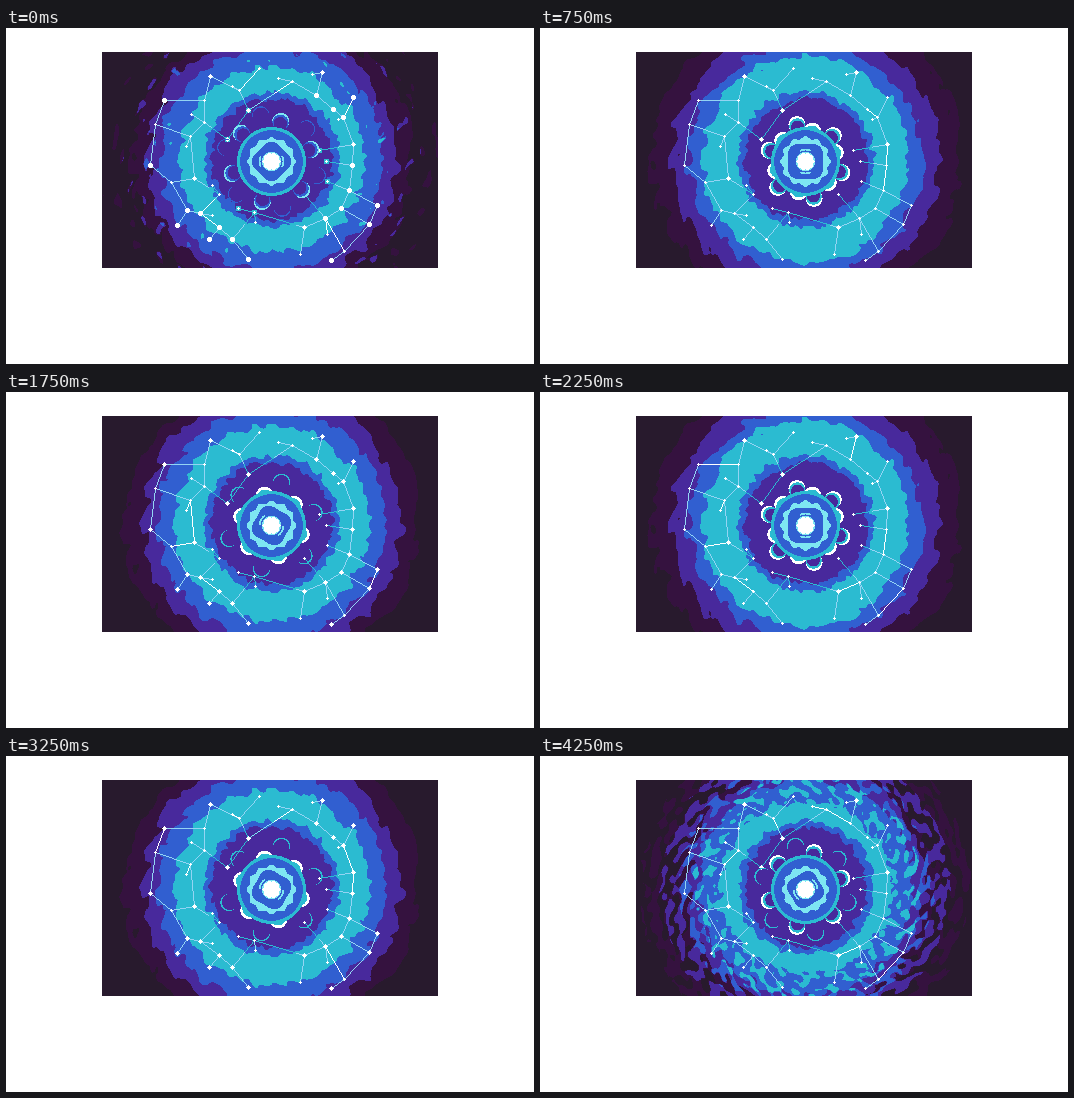
An HTML page with a canvas for the animation above (4500 ms loop, 528 px wide and 336 px high).

```html
<!DOCTYPE html>
<html lang="en">
<head>
<meta charset="utf-8">
<title>Pulsing nebula</title>
<style>
html, body { margin: 0; width: 100%; height: 100%; overflow: hidden; background: #fff; }
canvas { position: absolute; left: 96px; top: 24px; width: 336px; height: 216px; image-rendering: pixelated; }
</style>
</head>
<body>
<canvas id="sky" width="336" height="216"></canvas>
<script>
const W = 336, H = 216, OX = 96, OY = 24;
const STEP = 250, STEPS = 18, PHASES = 6;
const CX = 265, CY = 133, TAU = Math.PI * 2;

const BG = 0, PURPLE = 2, BLUE = 3, CYAN = 4, PALE = 5, WHITE = 6, LINE = 7;
const palette = ['#281a2d', '#35123f', '#48299c', '#315fd0', '#2bbbd1', '#7de6f2', '#ffffff', '#93d4f3']
  .map(h => [1, 3, 5].map(i => parseInt(h.slice(i, i + 2), 16)));

// Key stars: the first group swells once a cycle, the second stays bright.
const pulsing = [
  [158, 72], [144, 137], [347, 69], [310, 67], [327, 81], [337, 89], [346, 137],
  [343, 162], [335, 180], [319, 190], [371, 177], [363, 196], [325, 232], [242, 231],
  [213, 199], [194, 185], [181, 182], [171, 197], [226, 211], [203, 211]
];
const bright = [
  [204, 48], [316, 44], [242, 82], [221, 111], [347, 116], [188, 150], [298, 199]
];
const hubs = [
  [286, 53], [233, 62], [198, 72], [198, 94], [184, 108], [165, 154],
  [298, 166], [213, 166], [248, 184], [338, 223], [149, 96]
];
const keys = [...pulsing, ...bright, ...hubs];

function hash(x, y, seed) {
  let h = Math.imul(x, 374761393) ^ Math.imul(y, 668265263) ^ Math.imul(seed + 7, 974634777);
  h = Math.imul(h ^ (h >>> 13), 1274126177);
  h = Math.imul(h ^ (h >>> 15), 2246822519);
  return ((h ^ (h >>> 16)) >>> 0) / 4294967296;
}

// Gradient noise, wrapping in x after `wrap` cells.
function noise(x, y, wrap, seed) {
  const ix = Math.floor(x), iy = Math.floor(y), fx = x - ix, fy = y - iy;
  const smooth = v => v * v * v * (v * (v * 6 - 15) + 10);
  const corner = (i, j) => {
    const a = hash((ix + i + wrap) % wrap, iy + j, seed) * TAU;
    return Math.cos(a) * (fx - i) + Math.sin(a) * (fy - j);
  };
  const mix = (a, b, t) => a + (b - a) * t;
  const sx = smooth(fx);
  return mix(mix(corner(0, 0), corner(1, 0), sx), mix(corner(0, 1), corner(1, 1), sx), smooth(fy));
}

const easeOut = (t, power) => 1 - (1 - t) ** power;
const ringAge = phase => (phase + 2) % PHASES;
const growth = phase => easeOut(ringAge(phase) / 5, 1.7);

// Outer radius of cyan, blue, purple and dusk.
const ringRadii = e => [78 + 25 * e, 104 + 13 * e, 114 + 20 * e, 118 + 35 * e];

function makeNebula(phase) {
  const px = new Uint8Array(W * H);
  const age = ringAge(phase), e = growth(phase);
  const ring = ringRadii(e);
  const debris = ringRadii(1).map(r => r + 5 * (age + 1));
  const worn = i => 0.35 * (age - 1) - 0.05 + 0.06 * (3 - i);

  for (let y = 0; y < H; y++) {
    for (let x = 0; x < W; x++) {
      const dx = x + OX - 265.5, dy = y + OY - 131, r = Math.hypot(dx, dy);
      const turn = Math.atan2(dy, dx) / TAU + 0.5 + r * 0.0006;
      const drift = r - age * 5;
      const polar = (cells, depth, seed) => noise(turn * cells, drift / depth, cells, seed);
      const bump = polar(44, 14, 1) * 9 + polar(90, 7, 2) * 4;
      let c = BG;
      if (r + bump * 0.7 < 60 + e) c = PURPLE;
      else if (r + bump * 0.7 < 67 + e) c = BLUE;
      else {
        const first = ring.findIndex((edge, i) => r + bump * (1 + i * 0.15) < edge);
        if (first >= 0) c = CYAN - first;
        const mask = age < 3 ? polar(64, 8, 3) : -1;
        const shard = debris.findIndex((edge, i) => r + bump < edge && mask > worn(i));
        if (shard >= 0) c = Math.max(c, CYAN - shard);
      }
      px[y * W + x] = c;
    }
  }
  return px;
}

let buf;
function put(x, y, c) {
  x -= OX; y -= OY;
  if (x >= 0 && y >= 0 && x < W && y < H) buf[y * W + x] = c;
}

// Visits the pixels around a point; shade returns a colour or -1.
function area(cx, cy, size, shade) {
  for (let y = Math.floor(cy - size); y <= cy + size; y++) {
    for (let x = Math.floor(cx - size); x <= cx + size; x++) {
      const c = shade(x - cx, y - cy);
      if (c >= 0) put(x, y, c);
    }
  }
}

function disc([cx, cy], r, c) {
  area(cx, cy, Math.ceil(r), (dx, dy) => Math.hypot(dx, dy) <= r ? c : -1);
}

const dist = (a, b) => Math.hypot(a[0] - b[0], a[1] - b[1]);
const fromCore = p => dist(p, [CX, CY]);

// Two key stars are linked when no third lies closer to both.
function makeLinks() {
  const links = [];
  keys.forEach((a, i) => keys.slice(i + 1).forEach(b => {
    const d = dist(a, b);
    if (d < 70 && !keys.some(k => Math.max(dist(a, k), dist(b, k)) < d)) links.push([a, b]);
  }));
  return links;
}

const links = makeLinks();
const small = Array.from({ length: 16 }, (_, i) => {
  const a = i * 2.4, r = 48 + 50 * hash(i, 0, 11);
  return [Math.round(CX + r * Math.cos(a)), Math.round(CY + r * Math.sin(a))];
});
for (const s of small) {
  links.push([s, keys.reduce((best, k) => dist(s, k) < dist(s, best) ? k : best)]);
}

function line([x0, y0], [x1, y1], lit) {
  const n = Math.max(Math.abs(x1 - x0), Math.abs(y1 - y0));
  for (let i = 0; i <= n; i++) {
    const p = [Math.round(x0 + (x1 - x0) * i / n), Math.round(y0 + (y1 - y0) * i / n)];
    const near = fromCore(p) < 68;
    put(...p, lit ? (near ? PALE : WHITE) : (near ? CYAN : LINE));
  }
}

function drawStars(phase, step) {
  links.forEach(([a, b], i) => line(a, b, hash(i, step, 21) > 0.9));
  const pulse = Math.max(1, 2.7 - phase * 0.6);
  for (const s of [...keys, ...small]) {
    if (phase === 0 && fromCore(s) < 60) disc(s, 2.9, CYAN);
    disc(s, pulsing.includes(s) ? pulse : bright.includes(s) ? 2 : 1, WHITE);
  }
}

// Petals slide out from behind the core, then thin and fade.
function drawPetals(startAngle, age) {
  const reach = 31 + 3.4 * age, size = 8.5, thick = 2.4 - 0.3 * age;
  const rim = WHITE - Math.max(0, age - 2);
  for (let i = 0; i < 6; i++) {
    const a = (startAngle + i * 60) * Math.PI / 180;
    const ax = Math.cos(a), ay = Math.sin(a);
    area(CX + ax * reach, CY + ay * reach, size + 1, (dx, dy) => {
      const inward = t => Math.hypot(dx + ax * t, dy + ay * t);
      if (inward(0) > size) return -1;
      if (inward(thick) > size - 0.4) return rim;
      if (age > 3) return -1;
      if (inward(thick + 1) > size - 1.8) return rim - 2;
      return age < 2 ? BLUE : PURPLE;
    });
  }
}

function drawCore(phase) {
  const e = growth(phase), turn = phase * TAU / PHASES;
  area(CX, CY, 35, (dx, dy) => {
    const r = Math.hypot(dx, dy), a = Math.atan2(dy, dx);
    if (r > 34.5) return -1;
    if (r > 31.3) return CYAN;
    if (r < 8.5 + 0.6 * Math.cos(a * 10)) return WHITE;
    if (r < 9.8) return PALE;
    if (r > 11 && r < 12.8 && Math.cos(a * 2 - turn) > 0.6) return PALE;
    const outer = 22 + 2 * e + 1.2 * Math.cos(a * 12);
    const inner = 16.5 + 2.5 * e + 1.6 * Math.cos(a * 4 + turn);
    return r < outer && r > inner ? PALE : BLUE;
  });
}

const ctx = document.getElementById('sky').getContext('2d');
const nebulae = Array.from({ length: PHASES }, (_, phase) => makeNebula(phase));

function picture(step) {
  const phase = step % PHASES;
  buf = nebulae[phase].slice();
  drawStars(phase, step);
  const sets = [[-137, (phase + 3) % PHASES], [-103, (phase + 5) % PHASES]];
  sets.sort((a, b) => b[1] - a[1]).forEach(s => drawPetals(...s));
  drawCore(phase);
  const img = ctx.createImageData(W, H);
  buf.forEach((c, i) => img.data.set([...palette[c], 255], i * 4));
  return img;
}

const pictures = Array.from({ length: STEPS }, (_, i) => picture(i));
const start = performance.now();
let shown = -1;

function tick() {
  const step = Math.floor((performance.now() - start) / STEP) % STEPS;
  if (step !== shown) {
    ctx.putImageData(pictures[step], 0, 0);
    shown = step;
  }
  requestAnimationFrame(tick);
}
tick();
</script>
</body>
</html>
```
